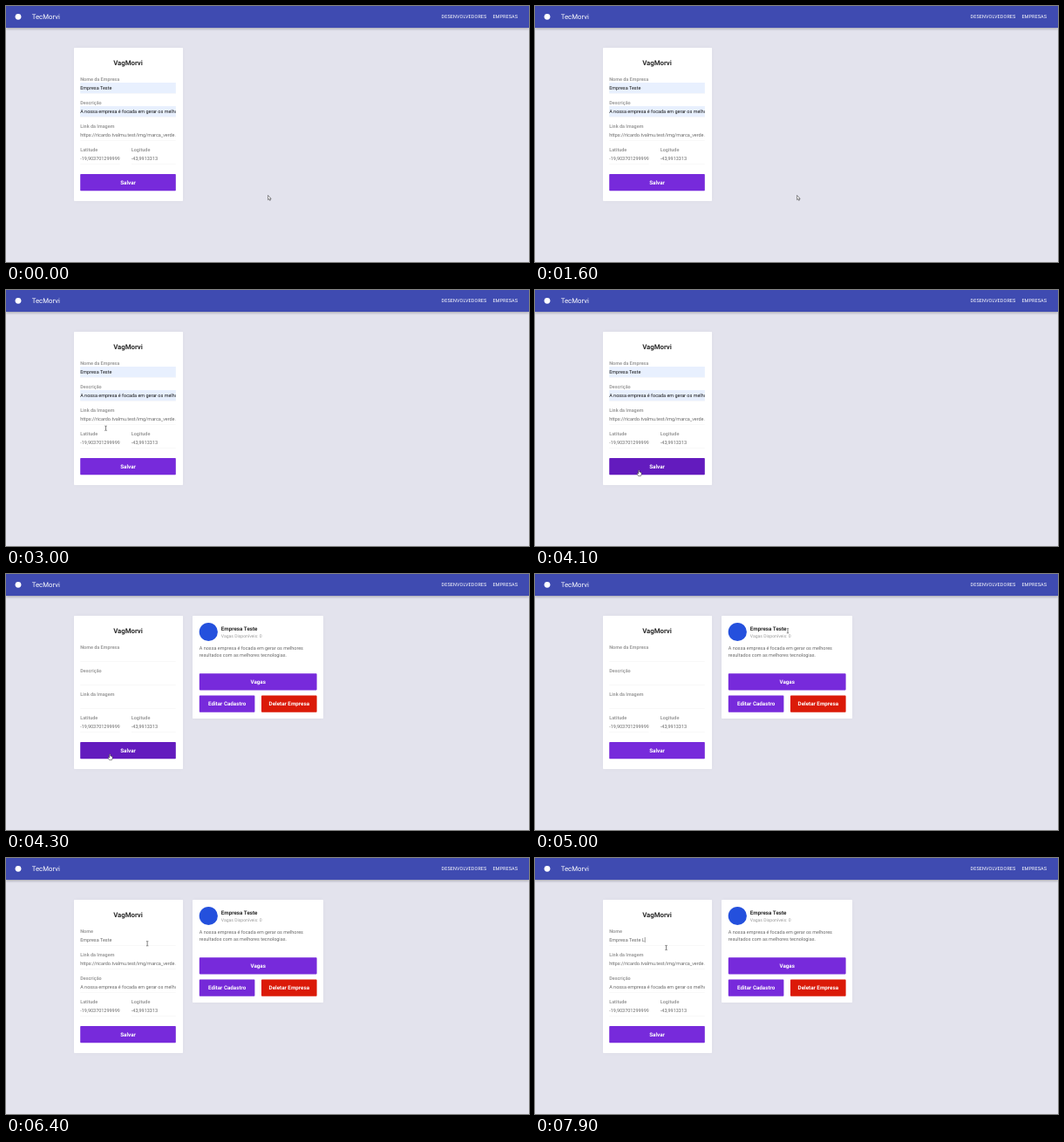
These frames come from a looping animation (600 by 294 pixels, 8000 ms). An HTML page:

```html
<!DOCTYPE html>
<html lang="pt">
<head>
<meta charset="utf-8">
<title>Cadastro de empresa</title>
<style>
  html, body { margin: 0; width: 100%; height: 100%; overflow: hidden; background: #e3e3ed; }
  #stage { position: relative; width: 600px; height: 294px; overflow: hidden; background: #e3e3ed; }
  .box { position: absolute; box-sizing: border-box; }
  header { left: 0; top: 0; width: 600px; height: 25px; background: #3f4bb1;
    box-shadow: 0 .8px 1.6px -.4px rgba(0,0,0,.2), 0 1.6px 2px rgba(0,0,0,.14), 0 .4px 4px rgba(0,0,0,.12); }
  .card { background: #fff; border-radius: .8px; box-shadow: 0 0 5px rgba(0,0,0,.03); }
  svg { position: absolute; left: 0; top: 0; display: block; }
  text { font: 400 5.47px Roboto, Arial, sans-serif; fill: #666; text-rendering: geometricPrecision; white-space: pre; }
  .brand { font-size: 7.8px; fill: #fff; }
  .nav { fill: #fff; letter-spacing: .1px; }
  .title { font-size: 7.8px; font-weight: 700; fill: #2c2c2c; text-anchor: middle; }
  .label { font-weight: 700; fill: #9c9c9c; }
  .name { font-size: 6.25px; font-weight: 700; fill: #2c2c2c; }
  .small { font-size: 5.08px; fill: #999; }
  .btn { font-size: 6.25px; font-weight: 700; fill: #fff; text-anchor: middle; }
  .auto { fill: #111; }
</style>
</head>
<body>
<div id="stage">
  <header class="box"></header>
  <div class="box card" style="left:77.5px;top:48px;width:125px;height:176px"></div>
  <div class="box card" id="company" style="left:213.6px;top:48px;width:150.8px;height:118.4px"></div>
  <svg id="art" width="600" height="294" viewBox="0 0 600 294">
    <defs>
      <clipPath id="wide"><rect x="85" y="80" width="109.8" height="110"/></clipPath>
      <clipPath id="half"><rect x="85" y="168" width="45.6" height="12"/></clipPath>
    </defs>
  </svg>
</div>
<script>
const LOOP = 8000, SAVE = 4300, EDIT = 5900;
const art = document.getElementById('art');
const company = document.getElementById('company');

function add(tag, attrs, parent = art, content = '') {
  const el = document.createElementNS('http://www.w3.org/2000/svg', tag);
  for (const key in attrs) el.setAttribute(key, attrs[key]);
  el.textContent = content;
  parent.appendChild(el);
  return el;
}
const write = (str, x, y, cls = '', parent = art) => add('text', { x, y, class: cls }, parent, str);
const group = (attrs = {}) => add('g', attrs);
const show = (el, on) => { el.style.display = on ? '' : 'none'; };

function button(label, x, y, w, fill, parent) {
  const rect = add('rect', { x, y, width: w, height: 19.2, rx: .8, fill }, parent);
  write(label, x + w / 2, y + 11.8, 'btn', parent);
  return rect;
}

// Header
add('circle', { cx: 14, cy: 12.3, r: 3.4, fill: '#fff' });
write('TecMorvi', 29.7, 15.2, 'brand');
write('DESENVOLVEDORES', 499.6, 14.4, 'nav');
write('EMPRESAS', 558.4, 14.4, 'nav');

// Form
const ROW = 27, LEFT = 85.2;
const BIO = ['A nossa empresa é focada em gerar os melhores', 'resultados com as melhores tecnologias.'];
const LINK = 'https://ricardo.tvalmu.test/img/marca_verde.png';
write('VagMorvi', 140, 67.6, 'title');
for (let i = 0; i < 4; i++) {
  const y = 100 + i * ROW;
  add('rect', { x: LEFT, y, width: i < 3 ? 109.6 : 45.5, height: .4, fill: '#eee' });
}
add('rect', { x: 143.8, y: 181, width: 51, height: .4, fill: '#eee' });
const fills = [0, 1].map(i =>
  add('rect', { x: LEFT, y: 88 + i * ROW, width: 109.6, height: 12.2, fill: '#e8f0fe' }));
const labels = [0, 1, 2].map(i => write('', LEFT, 86.4 + i * ROW, 'label'));
const fields = group({ 'clip-path': 'url(#wide)' });
const values = [0, 1, 2].map(i => write('', LEFT, 96 + i * ROW, '', fields));
write('Latitude', LEFT, 167.3, 'label');
write('Logitude', 143.8, 167.3, 'label');
write('-19,903701299999', LEFT, 176.8, '', group({ 'clip-path': 'url(#half)' }));
write('-43,9913313', 143.8, 176.8);
const save = button('Salvar', LEFT, 193, 109.6, '#772adb');
const caret = add('rect', { y: 91, width: .5, height: 6, fill: '#333' });

// Company card
const card = group();
add('circle', { cx: 232.3, cy: 66.5, r: 10.6, fill: '#2450dd' }, card);
write('Empresa Teste', 246.8, 65.2, 'name', card);
write('Vagas Disponíveis: 0', 246.8, 72.8, 'small', card);
BIO.forEach((line, i) => write(line, 221.8, 87.2 + i * 7.8, '', card));
const jobs = button('Vagas', 221.8, 114.2, 134.8, '#772adb', card);
const edit = button('Editar Cadastro', 221.8, 139.6, 63.6, '#772adb', card);
button('Deletar Empresa', 293, 139.6, 63.6, '#db1a08', card);

// Pointers, drawn around their hot spot
const pointer = group();
const shapes = {
  arrow: add('path', { d: 'M0 0V5.2L1.2 4.2 2 6 2.9 5.6 2.1 3.9H3.6Z', fill: '#fff', stroke: '#222', 'stroke-width': .5 }, pointer),
  beam: add('path', { d: 'M-1.2-2.6H-.3L0-2.3.3-2.6H1.2M0-2.3V2.3M-1.2 2.6H-.3L0 2.3.3 2.6H1.2', fill: 'none', stroke: '#333', 'stroke-width': .6 }, pointer),
  hand: add('path', { d: 'M-.6.5Q0-.3.6.5V2.4L2.9 3V5L2.2 7H-.6L-2.2 4.4-1.7 3.7-.6 4.4Z', fill: '#fff', stroke: '#222', 'stroke-width': .5 }, pointer)
};

// time, x, y
const path = [
  [0, 300.6, 217.4], [2100, 300.6, 217.4], [2600, 185, 165], [2800, 120, 157],
  [3000, 114.5, 158.6], [3400, 119.2, 206.6], [4400, 119.2, 206.6], [4650, 203, 130],
  [4850, 264, 58], [5000, 290, 65.2], [5200, 289, 74], [5400, 274, 118],
  [5600, 256, 147], [6100, 256, 147], [6400, 162.3, 98.3], [6700, 112, 95.5],
  [6950, 112, 95.5], [7200, 138, 99], [7500, 150.5, 103], [LOOP, 150.5, 103]
];
const kinds = [
  [0, 'arrow'], [2750, 'beam'], [3270, 'hand'], [4470, 'arrow'], [4840, 'beam'],
  [5300, 'arrow'], [5380, 'hand'], [6150, 'arrow'], [6330, 'beam']
];
const typed = [[0, 'Empresa Teste'], [7650, 'Empresa Teste '], [7800, 'Empresa Teste L']];

const at = (steps, t) => steps.filter(s => s[0] <= t).pop()[1];

function place(t) {
  const i = path.findIndex(p => p[0] > t);
  const [t0, x0, y0] = path[i - 1], [t1, x1, y1] = path[i];
  const k = (t - t0) / (t1 - t0);
  return [x0 + (x1 - x0) * k, y0 + (y1 - y0) * k];
}

// Hover colour, fading in and out
function hover(rect, t, from, to) {
  const ramp = s => Math.min(1, Math.max(0, (t - s) / 300));
  const k = ramp(from) - ramp(to) * ramp(from);
  const mix = (a, b) => Math.round(a + (b - a) * k);
  rect.setAttribute('fill', `rgb(${mix(119, 99)},${mix(42, 27)},${mix(219, 190)})`);
}

function form(t) {
  if (t < SAVE) return [['Nome da Empresa', 'Empresa Teste'], ['Descrição', BIO.join(' ')], ['Link da Imagem', LINK]];
  if (t < EDIT) return [['Nome da Empresa', ''], ['Descrição', ''], ['Link da Imagem', '']];
  return [['Nome', at(typed, t)], ['Link da Imagem', LINK], ['Descrição', BIO.join(' ')]];
}

function draw(t) {
  const saved = t >= SAVE;
  show(company, saved);
  show(card, saved);
  fills.forEach(f => show(f, !saved));
  form(t).forEach(([label, value], i) => {
    labels[i].textContent = label;
    values[i].textContent = value;
    values[i].setAttribute('class', !saved && i < 2 ? 'auto' : '');
  });
  hover(save, t, 3270, 4470);
  hover(jobs, t, 5380, 5480);
  hover(edit, t, 5540, 6130);

  const focused = t >= 6850;
  show(caret, focused && (t >= 7650 || (t - 6850) % 1000 < 500));
  if (focused) caret.setAttribute('x', LEFT + values[0].getComputedTextLength() + .2);

  pointer.setAttribute('transform', `translate(${place(t)})`);
  const kind = at(kinds, t);
  for (const key in shapes) show(shapes[key], key === kind);
}

const start = performance.now();
function tick() {
  draw((performance.now() - start) % LOOP);
  requestAnimationFrame(tick);
}
tick();
</script>
</body>
</html>
```
